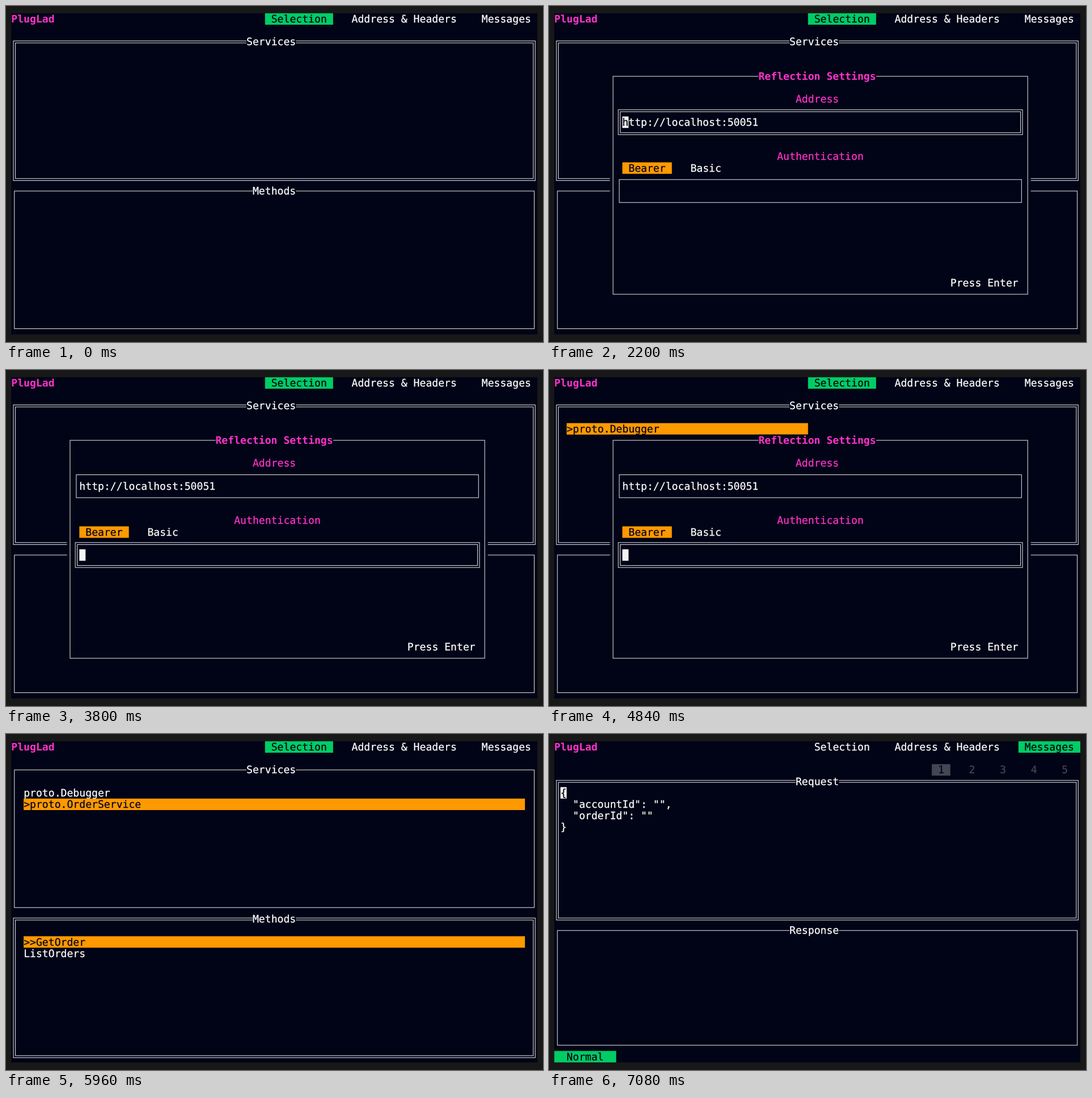
Recreate the animation shown at these times as an HTML page. Size 947 by 592 pixels, loop 8.72 s.

```html
<!DOCTYPE html>
<html lang="en">
<head>
<meta charset="utf-8">
<title>Terminal client</title>
<style>
html, body { margin: 0; width: 100%; height: 100%; overflow: hidden; background: #181818; }
svg { display: block; width: 947px; height: 592px; }
text {
  font: 18.13px "DejaVu Sans Mono", monospace;
  white-space: pre;
  text-rendering: geometricPrecision;
  fill: currentColor;
  stroke: currentColor;
  stroke-width: 0.25;
}
.bold { font-weight: bold; stroke: none; }
.line { fill: none; stroke: #d6d7db; stroke-width: 1.1; }
</style>
</head>
<body>
<svg id="stage" viewBox="0 0 947 592" xmlns="http://www.w3.org/2000/svg"></svg>
<script>
const BG = '#010416', WHITE = '#ffffff', PINK = '#ff33cc', GREEN = '#00cc66',
      ORANGE = '#ff9900', GRAY = '#444653', CURSOR = '#f5f5f5';
const LOOP = 8720;
const URL_TEXT = 'http://localhost:50051';

// Terminal grid: 85 columns by 28 rows
const CELL_W = 10.914, CELL_H = 20.21;
const X = col => 9.3 + col * CELL_W;
const Y = row => 12.75 + row * CELL_H;

const escape = s => s.replace(/&/g, '&amp;').replace(/</g, '&lt;').replace(/>/g, '&gt;');

const rect = (x, y, w, h, attrs) =>
  `<rect x="${x.toFixed(2)}" y="${y.toFixed(2)}" width="${w.toFixed(2)}" height="${h.toFixed(2)}" ${attrs}/>`;

const fill = (col, row, cols, rows, color) =>
  rect(X(col), Y(row), cols * CELL_W, rows * CELL_H, `fill="${color}"`);

function text(col, row, str, color = WHITE, bold = false) {
  return `<text x="${X(col).toFixed(2)}" y="${(Y(row) + 16.2).toFixed(2)}" color="${color}"` +
    `${bold ? ' class="bold"' : ''}>${escape(str)}</text>`;
}

const outline = (c1, r1, c2, r2, grow) =>
  rect(X(c1 + 0.5) - grow, Y(r1 + 0.5) - grow,
    (c2 - c1) * CELL_W + 2 * grow, (r2 - r1) * CELL_H + 2 * grow, 'class="line"');

// Frame through the centres of its border cells
function box(c1, r1, c2, r2, double) {
  return double
    ? outline(c1, r1, c2, r2, 1.75) + outline(c1, r1, c2, r2, -1.75)
    : outline(c1, r1, c2, r2, 0);
}

const label = (col, row, str, color, bold) =>
  fill(col, row, str.length, 1, BG) + text(col, row, str, color, bold);

const badge = (col, row, str, color) =>
  fill(col, row, str.length, 1, color) + text(col, row, str, BG);

const cursor = (col, row, ch = ' ') => badge(col, row, ch, CURSOR);

const TABS = [[41, ' Selection '], [54, ' Address & Headers '], [75, ' Messages ']];

function header(active) {
  return fill(0, 0, 85, 28, BG) + text(0, 0, 'PlugLad', PINK, true) +
    TABS.map(([col, str], i) => i === active ? badge(col, 0, str, GREEN) : text(col, 0, str)).join('');
}

function list(row, items, chosen, mark, cols = 81) {
  return items.map((item, i) => i === chosen
    ? fill(2, row + i, cols, 1, ORANGE) + text(2, row + i, mark + item, BG)
    : text(2, row + i, item)).join('');
}

function selection({ focus = 0, services = [], service = -1, methods = [], method = -1, cols }) {
  return header(0) +
    box(0, 2, 84, 14, focus === 0) + label(38, 2, 'Services') +
    list(4, services, service, '>', cols) +
    box(0, 15, 84, 27, focus === 1) + label(39, 15, 'Methods') +
    list(17, methods, method, '>>');
}

function authTabs(col, row, basic) {
  return (basic ? text(col, row, ' Bearer ') : badge(col, row, ' Bearer ', ORANGE)) +
    (basic ? badge(col + 10, row, ' Basic ', ORANGE) : text(col + 10, row, ' Basic '));
}

// Address and authentication fields; row is that of the first title
function fields(c1, c2, row, focus, basic) {
  return text(39, row, 'Address', PINK) +
    box(c1, row + 1, c2, row + 3, focus === 'address') +
    text(c1 + 1, row + 2, URL_TEXT) +
    (focus === 'address' ? cursor(c1 + 1, row + 2, URL_TEXT[0]) : '') +
    text(36, row + 5, 'Authentication', PINK) +
    authTabs(c1 + 1, row + 6, basic) +
    box(c1, row + 7, c2, row + 9, focus === 'auth') +
    (focus === 'auth' ? cursor(c1 + 1, row + 8) : '');
}

function dialog(focus, basic) {
  return fill(9, 5, 68, 20, BG) + box(9, 5, 76, 24) +
    label(33, 5, 'Reflection Settings', PINK, true) +
    fields(10, 75, 7, focus, basic) +
    text(64, 23, 'Press Enter');
}

const footer = () => badge(0, 27, '  Normal  ', GREEN);

const addressPage = () => header(1) + fields(0, 84, 2, 'address', false) +
  text(39, 13, 'Headers', PINK) + footer();

function messages() {
  const body = ['{', '  "accountId": "",', '  "orderId": ""', '}'];
  const pages = [1, 2, 3, 4, 5].map((n, i) => i
    ? text(62 + 5 * i, 2, String(n), GRAY)
    : badge(61, 2, ` ${n} `, GRAY));
  return header(2) + pages.join('') +
    box(0, 3, 84, 15, true) + label(39, 3, 'Request') +
    body.map((str, i) => text(1, 4 + i, str)).join('') + cursor(1, 4, '{') +
    box(0, 16, 84, 26) + label(38, 16, 'Response') + footer();
}

const services = ['proto.Debugger', 'proto.OrderService'];
const methods = ['GetOrder', 'ListOrders'];
const blank = selection({});

const steps = [
  [0, blank],
  [1120, blank + dialog()],
  [2200, blank + dialog('address')],
  [2760, blank + dialog('auth')],
  [3280, blank + dialog('auth', true)],
  [3800, blank + dialog('auth')],
  [4840, selection({ services: services.slice(0, 1), service: 0, cols: 39 }) + dialog('auth')],
  [4880, selection({ services, service: 0 })],
  [5400, selection({ services, service: 1, methods })],
  [5960, selection({ focus: 1, services, service: 1, methods, method: 0 })],
  [6520, addressPage()],
  [7080, messages()]
];

const stage = document.getElementById('stage');
stage.innerHTML = steps.map(([, svg]) => `<g display="none">${svg}</g>`).join('');
const scenes = [...stage.children];
let shown = -1;

function show(time) {
  const t = time % LOOP;
  const next = steps.filter(([at]) => at <= t).length - 1;
  if (next === shown) return;
  if (shown >= 0) scenes[shown].setAttribute('display', 'none');
  scenes[next].removeAttribute('display');
  shown = next;
}

const start = performance.now();
function tick() {
  show(Math.max(0, performance.now() - start));
  requestAnimationFrame(tick);
}
tick();
</script>
</body>
</html>
```
